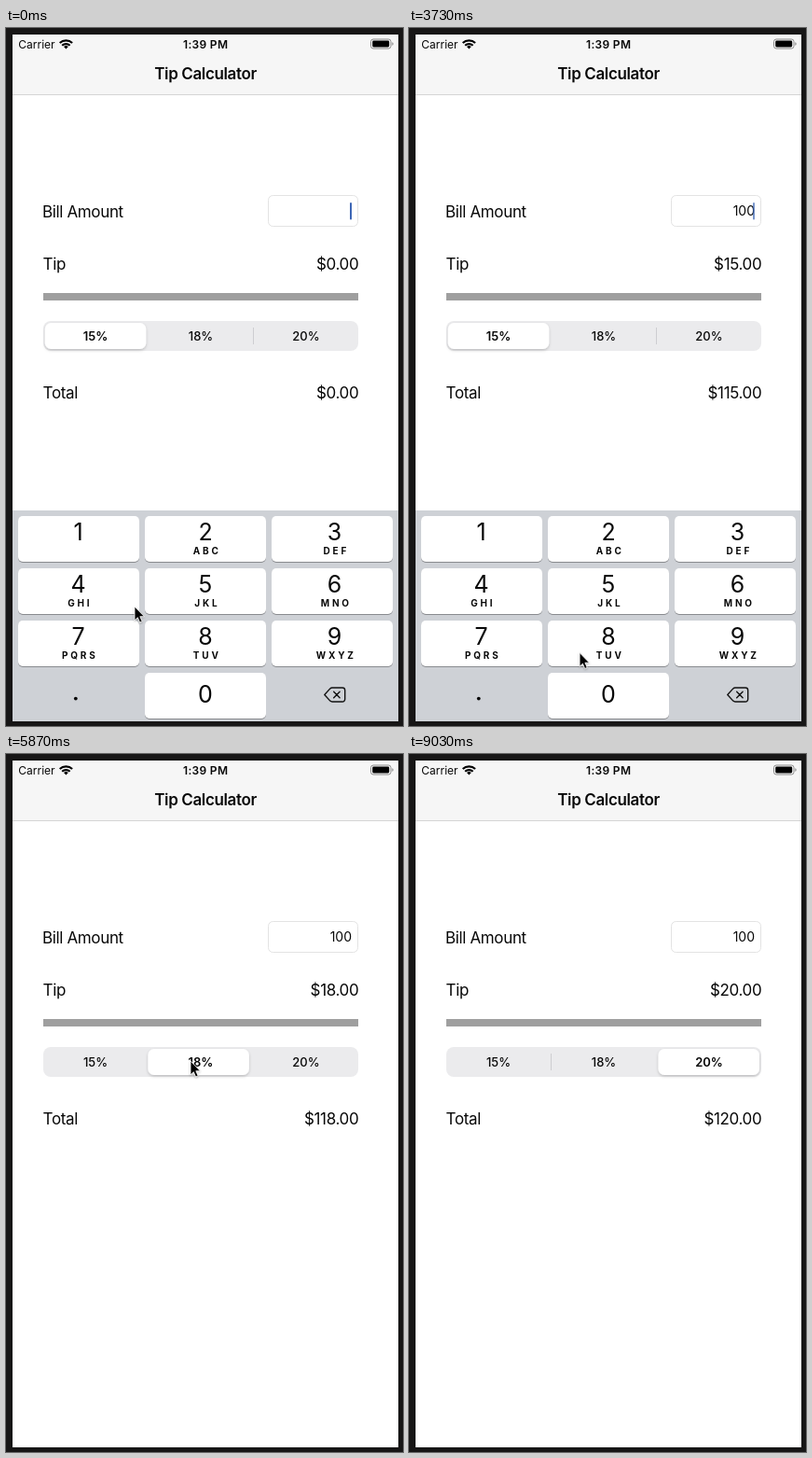
An HTML page that plays this animation: 426 px wide and 748 px high, repeating every 9.76 s.

```html
<!DOCTYPE html>
<html lang="en">
<head>
<meta charset="utf-8">
<title>Tip Calculator</title>
<style>
  html, body { margin: 0; width: 100%; height: 100%; overflow: hidden; background: #171616; }
  svg { display: block; width: 426px; height: 748px; }
  text { font-family: Inter, Roboto, sans-serif; font-optical-sizing: none; fill: #080808; white-space: pre; }
  .status { font-size: 12px; }
  .title { font-size: 17px; font-weight: 600; letter-spacing: -.37px; }
  .body { font-size: 17px; letter-spacing: -.36px; }
  .field { font-size: 14px; }
  .seg { font-size: 13px; font-weight: 500; }
  .seg.on { font-weight: 600; }
  .digit { font-size: 25px; }
  .letters { font-size: 10px; font-weight: 700; letter-spacing: 2.8px; }
  .mid { text-anchor: middle; }
  .end { text-anchor: end; }
  .key { fill: #fff; }
  .key.down { fill: #b5bfcf; }
</style>
</head>
<body>
<svg viewBox="0 0 426 748">
  <defs>
    <clipPath id="screen"><rect x="7" y="7" width="414" height="736"/></clipPath>
    <filter id="soft" x="-20%" y="-30%" width="140%" height="180%">
      <feDropShadow dx="0" dy="1.5" stdDeviation="1.5" flood-opacity=".2"/>
    </filter>
    <filter id="arrowShadow" x="-50%" y="-30%" width="200%" height="170%">
      <feDropShadow dx="0" dy="1" stdDeviation="1" flood-opacity=".3"/>
    </filter>
  </defs>
  <rect width="426" height="748" fill="#171616"/>
  <g clip-path="url(#screen)">
    <rect x="7" y="7" width="414" height="736" fill="#fff"/>
    <rect x="7" y="7" width="414" height="64" fill="#f6f6f6"/>
    <rect x="7" y="71" width="414" height="1" fill="#d5d5d5"/>

    <text class="status" x="13.3" y="22">Carrier</text>
    <g fill="none" stroke="#000" stroke-width="2.1">
      <path d="M57.7 16.1a9.5 9.5 0 0 1 13.4 0M60.2 18.8a6 6 0 0 1 8.4 0"/>
      <path d="M64.4 22.6l-2.4-2.5a3.5 3.5 0 0 1 4.8 0z" fill="#000" stroke="none"/>
    </g>
    <text class="status mid" x="214.2" y="22" font-weight="600" letter-spacing=".3">1:39 PM</text>
    <rect x="391.5" y="12" width="21.5" height="10" rx="2.6" fill="none" stroke="#8b8b8b"/>
    <rect x="393.2" y="13.6" width="18" height="6.8" rx="1.3"/>
    <path d="M414.3 15.3a1.8 1.8 0 0 1 0 3.5z" fill="#8b8b8b"/>
    <text class="title mid" x="214" y="55">Tip Calculator</text>

    <text class="body" x="39" y="203">Bill Amount</text>
    <text class="body" x="39.6" y="259">Tip</text>
    <text class="body" x="39.6" y="397">Total</text>
    <text class="body end" id="tip" x="378.3" y="259"></text>
    <text class="body end" id="total" x="378.3" y="397"></text>

    <rect x="281.5" y="179.5" width="96" height="33" rx="5" fill="#fff" stroke="#e3e3e3"/>
    <text class="field end" id="bill" x="371" y="201"></text>
    <rect id="caret" x="369" y="187" width="2" height="18.5" rx="1" fill="#3d66b5"/>

    <rect x="40" y="284" width="338" height="8" fill="#9f9f9f"/>

    <rect x="40" y="314" width="338" height="32" rx="8" fill="#ebebed"/>
    <rect id="div1" x="152" y="321" width="1" height="18" fill="#cdcdd1"/>
    <rect id="div2" x="265" y="321" width="1" height="18" fill="#cdcdd1"/>
    <rect id="thumb" y="316" width="108.5" height="28" rx="6.5" fill="#fff" filter="url(#soft)"/>
    <text class="seg mid" x="96" y="334.8">15%</text>
    <text class="seg mid" x="209" y="334.8">18%</text>
    <text class="seg mid" x="322" y="334.8">20%</text>

    <g id="pad">
      <rect x="7" y="517" width="414" height="232" fill="#ced1d6"/>
      <g id="keys"></g>
      <circle cx="74.8" cy="718.6" r="1.9" fill="#080808"/>
      <path d="M341.8 714.5l6-6.6q.9-.9 2.200-.9h11a2.700 2.700 0 0 1 2.700 2.700v9.600a2.700 2.700 0 0 1-2.700 2.700h-11q-1.300 0-2.200-.9zM351.700 711.300l6.400 6.400m0-6.400l-6.400 6.400"
        fill="none" stroke="#111" stroke-width="1.400" stroke-linecap="round" stroke-linejoin="round"/>
    </g>
  </g>
  <path id="arrow" d="M0 0V14.800L3.300 11.700L5.600 17L8.100 15.900L5.800 10.700H10.400Z"
    fill="#000" stroke="#fff" stroke-width=".8" stroke-linejoin="round" filter="url(#arrowShadow)"/>
</svg>
<script>
const LOOP = 9760;
const $ = id => document.getElementById(id);

// Number pad
const letters = ['', 'ABC', 'DEF', 'GHI', 'JKL', 'MNO', 'PQRS', 'TUV', 'WXYZ'];
const centers = [77.5, 214, 352.5];
function keyMarkup(digit, col, row, sub) {
  const x = 13 + col * 136, y = 523 + row * 56, c = centers[col];
  return `<rect x="${x}" y="${y + 1}" width="130" height="49" rx="5" fill="#898b8f"/>
    <rect class="key" id="key${digit}" x="${x}" y="${y}" width="130" height="49" rx="5"/>
    <text class="digit mid" x="${c}" y="${y + (digit ? 26 : 32)}">${digit}</text>
    <text class="letters mid" x="${c + 1.8}" y="${y + 41}">${sub}</text>`;
}
$('keys').innerHTML = letters.map((s, i) => keyMarkup(i + 1, i % 3, Math.floor(i / 3), s)).join('')
  + keyMarkup(0, 1, 3, '');

// Pointer path: time, x, y
const path = [
  [0, 138, 620], [30, 138, 620], [170, 116, 563], [400, 116, 563],
  [670, 100, 538], [1300, 100, 538], [1470, 116, 625], [1730, 116, 625],
  [1830, 133, 667], [2230, 185, 711], [3630, 185, 711], [4030, 173, 450],
  [4700, 173, 450], [5130, 180, 379], [5270, 180, 379], [5500, 198, 329],
  [6200, 198, 329], [6600, 322, 334], [7600, 322, 334], [7730, 370, 250],
  [8070, 379, 211], [8570, 379, 211], [8770, 430, 146], [LOOP, 430, 146]
];

// Tangent at a knot; zero next to a rest
function slope(i, k) {
  const a = path[i - 1], b = path[i], c = path[i + 1];
  if (!a || !c || a[2] === b[2] || b[2] === c[2]) return 0;
  return (c[k] - a[k]) / (c[0] - a[0]);
}
function pointer(t, k) {
  let i = 0;
  while (i < path.length - 2 && path[i + 1][0] <= t) i++;
  const a = path[i], b = path[i + 1], d = b[0] - a[0], u = (t - a[0]) / d, v = 1 - u;
  return a[k] * (1 + 2 * u) * v * v + b[k] * (3 - 2 * u) * u * u
    + d * u * v * (slope(i, k) * v - slope(i + 1, k) * u);
}

// Critically damped spring from 0 to 1
function spring(t, w) {
  const x = Math.max(0, t) * w / 1000;
  return 1 - (1 + x) * Math.exp(-x);
}
const within = (t, a, b) => t >= a && t < b;

function caretAlpha(t) {
  if (t > 4535) return 0;
  const out = t < 1230 ? 30 : t < 2430 ? 1800 : 3300;
  if (t < out) return 1;
  const p = (t - out) % 970;
  if (p < 130) return 1 - p / 130;
  if (p < 340) return 0;
  return Math.min(1, (p - 340) / 130);
}

const segs = document.querySelectorAll('.seg');
function setText(id, s) {
  if ($(id).textContent !== s) $(id).textContent = s;
}

function draw(t) {
  const bill = t < 1230 ? 0 : t < 2430 ? 1 : t < 2730 ? 10 : 100;
  const sel = t < 5580 ? 0 : t < 6870 ? 1 : 2;
  const tip = bill * [15, 18, 20][sel] / 100;
  setText('bill', bill ? String(bill) : '');
  setText('tip', '$' + tip.toFixed(2));
  setText('total', '$' + (bill + tip).toFixed(2));
  $('caret').setAttribute('opacity', caretAlpha(t));

  const first = spring(t - 5580, 25), second = spring(t - 6870, 25);
  $('thumb').setAttribute('x', 41.8 + 111.2 * first + 115 * second - .5 * second);
  $('div1').setAttribute('opacity', second);
  $('div2').setAttribute('opacity', 1 - first);
  segs.forEach((s, i) => s.classList.toggle('on', i === sel));

  $('key1').classList.toggle('down', within(t, 1130, 1270));
  $('key0').classList.toggle('down', within(t, 2330, 2470) || within(t, 2570, 2800));
  $('pad').setAttribute('transform', `translate(0 ${232 * spring(t - 4535, 17)})`);
  $('arrow').setAttribute('transform', `translate(${pointer(t, 1)} ${pointer(t, 2)})`);
}

const start = performance.now();
function tick() {
  draw((performance.now() - start) % LOOP);
  requestAnimationFrame(tick);
}
tick();
</script>
</body>
</html>
```
